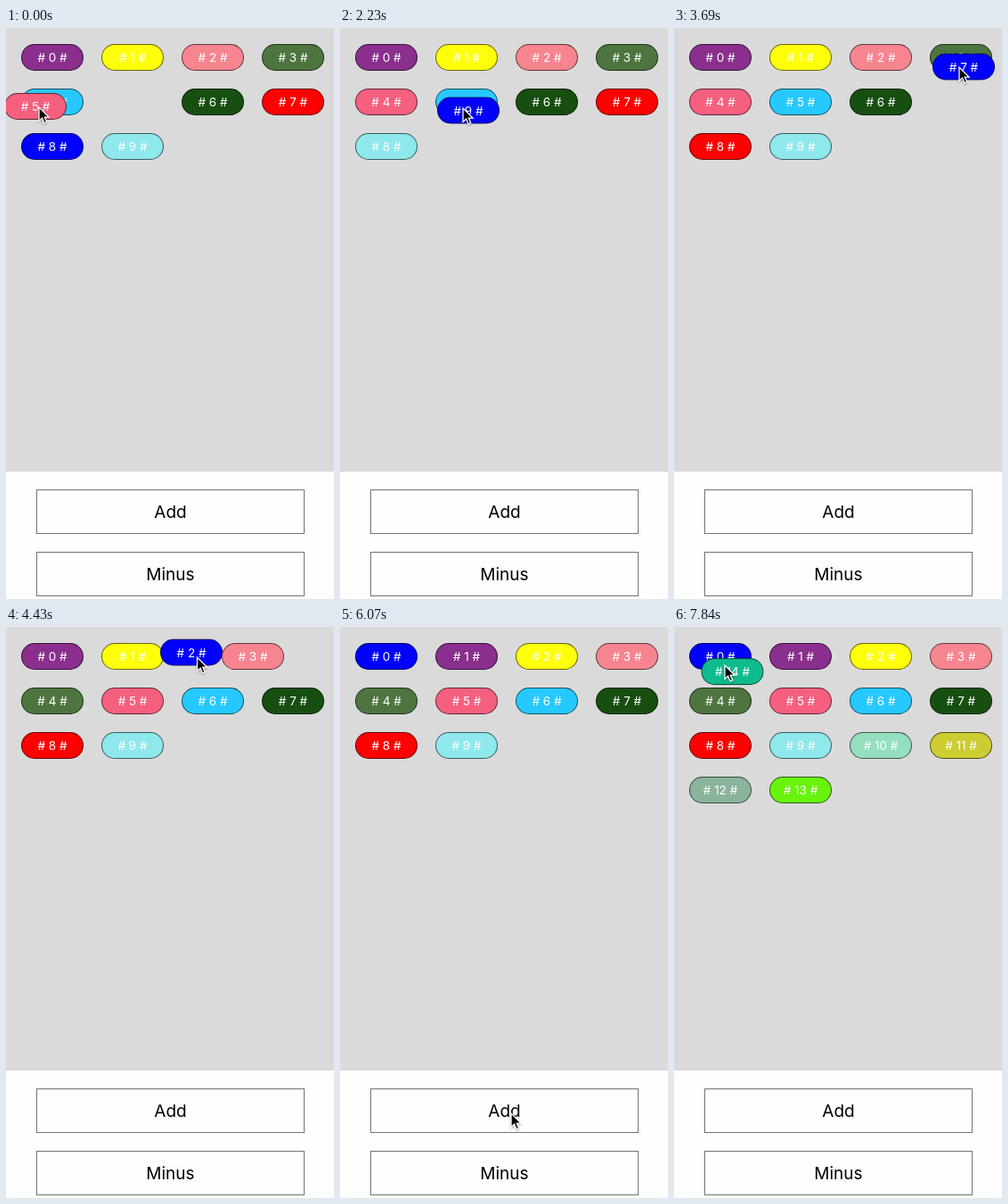
These frames come from a looping animation (368x641 px, 7.99 s). An HTML page:

```html
<!DOCTYPE html>
<html lang="en">
<head>
<meta charset="utf-8">
<title>Drag to reorder</title>
<style>
html, body { margin: 0; width: 100%; height: 100%; overflow: hidden; background: #fefefe; }
body { position: relative; font-family: Inter, Roboto, "Liberation Sans", sans-serif; }
#grid { position: absolute; left: 0; top: 0; width: 368px; height: 498px; background: #dadada; }
.tile, .button { position: absolute; box-sizing: border-box; text-align: center; white-space: pre; }
.tile {
  left: 0; top: 0; width: 70px; height: 30px; border: 1px solid rgba(0, 0, 0, .6);
  border-radius: 15px; color: #fff; font-size: 13.5px; line-height: 28px;
}
.button {
  left: 34px; width: 301px; height: 50px; border: 1px solid #737373;
  color: #000; font-size: 19px; line-height: 49px;
}
#cursor { position: absolute; left: -2px; top: -2px; z-index: 50; filter: drop-shadow(0 1px 1px rgba(0, 0, 0, .35)); }
</style>
</head>
<body>
<div id="grid"></div>
<div class="button" style="top:518px">Add</div>
<div class="button" style="top:588px">Minus</div>
<svg id="cursor" width="18" height="24" viewBox="-2 -2 18 24">
  <path d="M0 0V15.4L3.6 12L6 17.8L8.7 16.7L6.3 11.1H11Z" stroke="#fff" stroke-width="1.3"/>
</svg>
<script>
const LOOP = 7990, START = 300, STEP = 147.8, FIRST = -1, LAST = 51;
const W = 70, H = 30, GAP = 20, COLUMNS = 4;
const COLORS = ["#8a2f8d", "#ffff0a", "#f68590", "#4e7540", "#26c9ff",
  "#f6607f", "#164f10", "#ff0000", "#0000ff", "#8ee8ec",
  "#94dfbd", "#cccc33", "#8bb49c", "#68f40c", "#10bb90"];

// Pointer turns: [step, x, y]
const POINTER = [[-1, 37, 89], [0, 45, 87], [3, 70, 138], [5, 72, 110], [7, 106, 102],
  [10, 160, 140], [11, 138, 131], [13, 138, 90], [15, 138, 90], [18, 172, 90],
  [21, 302, 90], [23, 320, 44], [25, 318, 34], [29, 180, 34], [32, 97, 36],
  [33, 69, 38], [34, 57, 37], [37, 228, 380], [39, 192, 546], [45, 192, 546],
  [48, 226, 178], [49, 187, 115], [50, 92, 58], [51, 57, 43]];

// Where the pointer holds a tile, between two steps
const GRABS = [
  { tile: 5, from: -1, to: 0, dx: 39, dy: 16 },
  { tile: 8, from: 3, to: 10, dx: 57, dy: 30.5 },
  { tile: 8, from: 11, to: 15, dx: 29, dy: 12.5 },
  { tile: 8, from: 16, to: 24, dx: 30, dy: 15.5 },
  { tile: 8, from: 25, to: 34, dx: 41.5, dy: 20.5 },
  { tile: 14, from: 48, to: 51, dx: 26.5, dy: 8 }
];
const ADDS = [40, 42, 43, 44, 45];

const cursor = document.getElementById("cursor");
const tiles = COLORS.map(color => {
  const el = document.createElement("div");
  el.className = "tile";
  el.style.background = color;
  document.getElementById("grid").append(el);
  return el;
});

const mix = (a, b, p) => a + (b - a) * p;
const slot = i => [17 + (W + GAP) * (i % COLUMNS), 18 + (H + GAP) * Math.floor(i / COLUMNS)];
const place = (el, [x, y]) => { el.style.transform = `translate(${x}px, ${y}px)`; };
const grabAt = k => GRABS.find(g => k >= g.from && k <= g.to);

function pointerAt(k) {
  const j = Math.max(1, POINTER.findIndex(p => p[0] >= k));
  const [k0, x0, y0] = POINTER[j - 1], [k1, x1, y1] = POINTER[j];
  const p = (k - k0) / (k1 - k0);
  return [mix(x0, x1, p), mix(y0, y1, p)];
}

function heldPosition(grab, k) {
  const [x, y] = pointerAt(k);
  return [x - grab.dx, y - grab.dy];
}

// The slot that contains the centre of a tile placed at x, y
function slotUnder([x, y], count) {
  for (let i = 0; i < count; i++) {
    const [sx, sy] = slot(i);
    if (Math.abs(x - sx) <= W / 2 && Math.abs(y - sy) <= H / 2) return i;
  }
  return -1;
}

// A held tile takes the slot it hovered one step earlier.
function orderAt(k) {
  const order = [...Array(10).keys()];
  for (let s = 0; s <= k; s++) {
    const grab = grabAt(s - 1);
    if (grab) {
      const from = order.indexOf(grab.tile);
      const to = slotUnder(heldPosition(grab, s - 1), order.length);
      if (to >= 0) order.splice(to, 0, order.splice(from, 1)[0]);
    }
    if (ADDS.includes(s)) order.push(order.length);
  }
  return order;
}

function draw(k) {
  const order = orderAt(k), before = orderAt(k - 1), grab = grabAt(k);
  tiles.forEach((el, id) => {
    const i = order.indexOf(id);
    el.style.display = i < 0 ? "none" : "block";
    if (i < 0) return;
    el.textContent = `# ${i} #`;
    el.style.zIndex = i;
    if (grab && grab.tile === id) return place(el, heldPosition(grab, k));
    // A displaced tile is halfway to its new slot for one step.
    const old = before.indexOf(id);
    const a = slot(old < 0 ? i : old), b = slot(i);
    place(el, [mix(a[0], b[0], .5), mix(a[1], b[1], .5)]);
  });
  place(cursor, pointerAt(k));
}

let shown = null;
function tick() {
  const t = performance.now() % LOOP;
  const k = Math.max(FIRST, Math.min(LAST, Math.floor((t - START) / STEP + .1)));
  if (k !== shown) draw(shown = k);
  requestAnimationFrame(tick);
}
tick();
</script>
</body>
</html>
```
